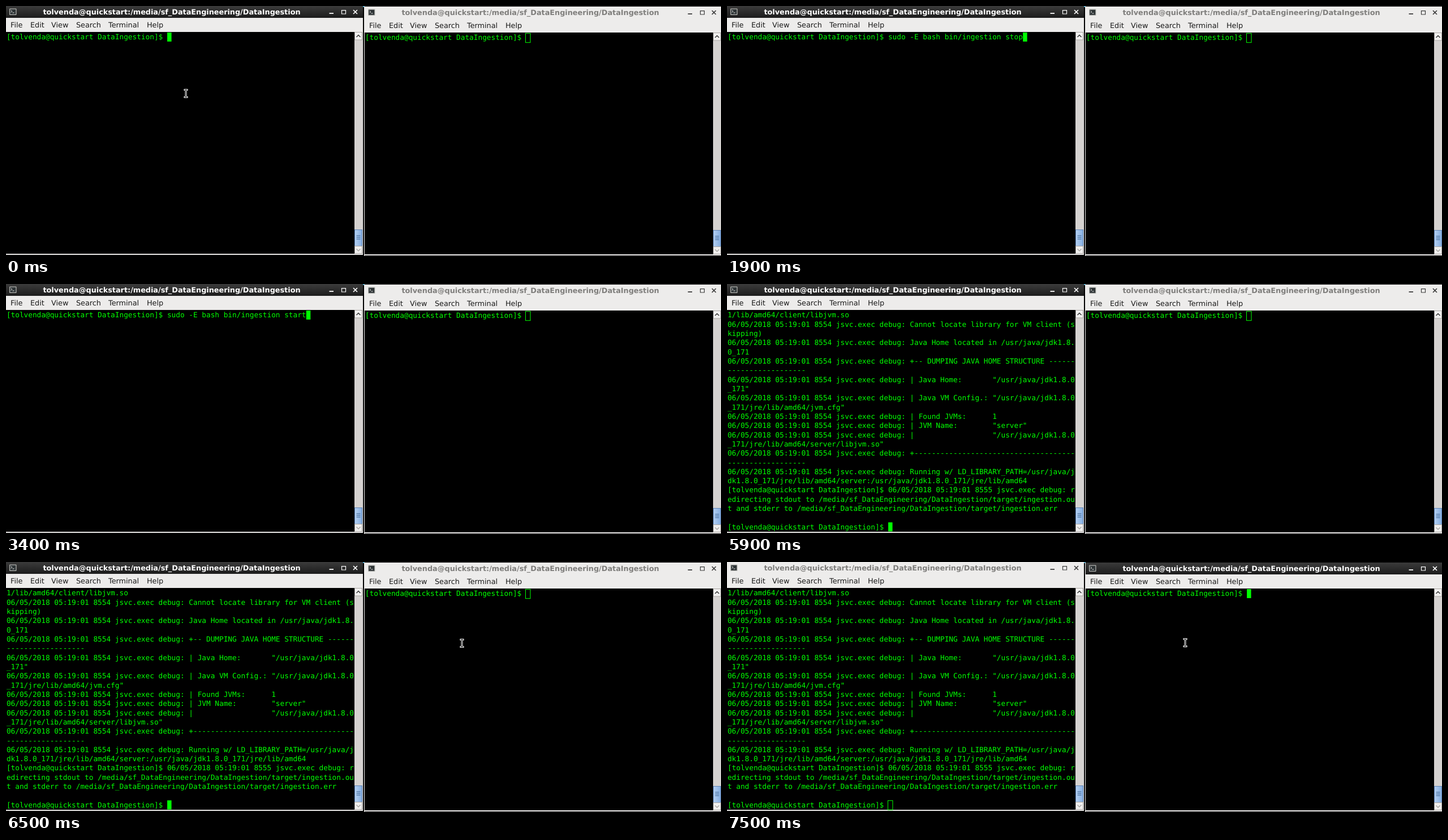
Animation, 1264 px wide and 443 px high, one loop 8 s. Source, as an HTML page:

```html
<!DOCTYPE html>
<html lang="en">
<head>
<meta charset="utf-8">
<title>Two terminals</title>
<style>
  html, body { margin: 0; width: 100%; height: 100%; overflow: hidden; background: #000; }
  svg { display: block; }
  text { white-space: pre; text-rendering: geometricPrecision; font: 12.8px "DejaVu Sans", sans-serif; }
  .title { font-weight: bold; text-anchor: middle; }
  .mono { font: 12.757px "DejaVu Sans Mono", monospace; fill: #0f0; }
</style>
</head>
<body>
<svg id="stage" width="1264" height="443" viewBox="0 0 1264 443"></svg>
<script>
const LOOP = 8000, COLS = 80, CELL = 7.68, ROW = 16.32, LEFT = 0.9, TOP = 47;
const USER = 'tolvenda@quickstart';
const TITLE = USER + ':/media/sf_DataEngineering/DataIngestion';
const PROMPT = `[${USER} DataIngestion]$ `;
const MENU = [['File', 8], ['Edit', 43], ['View', 80], ['Search', 124], ['Terminal', 181], ['Help', 249]];

const JDK = '/usr/java/jdk1.8.0_171', LIB = JDK + '/jre/lib/amd64', OUT = '/media/sf_DataEngineering/DataIngestion/target/ingestion';
const field = (name, value) => '| ' + name.padEnd(17) + value;
const log = [
  `Checking library ${JDK}/lib/amd64/client/libjvm.so`,
  'Cannot locate library for VM client (skipping)',
  `Java Home located in ${JDK}`,
  '+-- DUMPING JAVA HOME STRUCTURE ' + '-'.repeat(24),
  field('Java Home:', `"${JDK}"`),
  field('Java VM Config.:', `"${LIB}/jvm.cfg"`),
  field('Found JVMs:', '1'),
  field('JVM Name:', '"server"'),
  field('', `"${LIB}/server/libjvm.so"`),
  '+' + '-'.repeat(55),
  `Running w/ LD_LIBRARY_PATH=${LIB}/server:${LIB}`
].map(s => '06/05/2018 05:19:01 8554 jsvc.exec debug: ' + s);
log.push(`${PROMPT}06/05/2018 05:19:01 8555 jsvc.exec debug: redirecting stdout to ${OUT}.out and stderr to ${OUT}.err`);

const wrapped = log.flatMap(s => s.match(new RegExp(`.{1,${COLS}}`, 'g')));
const started = [...wrapped, ''];
const done = [...wrapped.slice(1), '', PROMPT];
const command = s => [PROMPT + s];

// Each step: start time, lines of the left terminal, pointer position, focused window
const steps = [
  [0, command(''), [318, 155], 0],
  [1400, command(''), null, 0],
  [1500, command('clear'), null, 0],
  [1900, command('sudo -E bash bin/ingestion stop'), null, 0],
  [3400, command('sudo -E bash bin/ingestion start'), null, 0],
  [4200, started, null, 0],
  [5900, done, null, 0],
  [6500, done, [806, 144], 0],
  [7200, done, [810, 143], 0],
  [7500, done, [810, 143], 1]
];

const rect = (x, y, w, h, fill, more = '') => `<rect x="${x}" y="${y}" width="${w}" height="${h}" fill="${fill}" ${more}/>`;
const line = (d, color, width = 1) => `<path d="${d}" fill="none" stroke="${color}" stroke-width="${width}"/>`;
const text = (x, y, s, more) => `<text x="${x}" y="${y}" ${more}>${s}</text>`;

function titleBar(focused) {
  const ink = focused ? '#fff' : '#3c3c3c';
  return rect(0, 0, 631, 21, focused ? 'url(#dark)' : '#edeceb') +
    rect(6, 4.5, 12.5, 11.5, '#b9bab6', 'rx="1"') + rect(7.2, 5.7, 10.1, 9.1, '#2e3436') +
    line('M8.7 7.7L11 9.5L8.7 11.3M11.5 12H14.5', '#e4e4e2') +
    text(293, 14.5, TITLE, `class="title" fill="${focused ? '#fff' : '#7f7e7c'}"`) +
    line('M571.5 13H579', ink, 1.8) +
    line('M593.5 7.5H600.5V14H593.5ZM593 7.7H601', ink, 1.2) +
    line('M614 7L621 14M621 7L614 14', ink, 1.7);
}

function scrollBar() {
  return rect(616, 46, 14, 393, '#d5d2d0') +
    rect(616.5, 46.5, 13, 13.5, '#f1f0ef', 'stroke="#a9a5a2"') +
    line('M619.5 55L623 51.5L626.5 55', '#333', 1.5) +
    rect(616.5, 396.5, 13, 29, 'url(#blue)', 'stroke="#5f83b5"') +
    line('M619.5 407H626.5M619.5 410H626.5M619.5 413H626.5', '#39608f') +
    rect(616.5, 425.5, 13, 13, '#f1f0ef', 'stroke="#a9a5a2"') +
    line('M619.5 430.5L623 434L626.5 430.5', '#aaa7a4', 1.5);
}

function terminal(lines, focused) {
  const row = lines.length - 1;
  const x = LEFT + lines[row].length * CELL, y = TOP + row * ROW;
  const caret = focused
    ? rect(x, y, CELL - 0.2, ROW - 0.3, '#0f0')
    : rect(x - 0.6, y + 0.4, CELL + 0.8, ROW, 'none', 'stroke="#0f0"');
  return lines.map((s, i) => text(LEFT, TOP + 12.4 + i * ROW, s, 'class="mono"')).join('') + caret;
}

function win(x, y, lines, focused) {
  return `<g transform="translate(${x} ${y})">` +
    rect(0, 0, 631, 441, '#edeceb') + titleBar(focused) +
    MENU.map(([s, mx]) => text(mx, 38.3, s, 'fill="#1a1a1a"')).join('') +
    rect(0, 46, 616, 393, '#000') + scrollBar() + terminal(lines, focused) + '</g>';
}

function pointer([x, y]) {
  const beam = 'M-2 -6.5H2M0 -6.5V6.5M-2 6.5H2';
  return `<g transform="translate(${x} ${y})" stroke-linecap="square">` +
    line(beam, '#fff', 3) + line(beam, '#000', 1) + '</g>';
}

const gradient = (id, ax, from, to) => `<linearGradient id="${id}" x1="0" y1="0" ${ax}><stop stop-color="${from}"/><stop offset="1" stop-color="${to}"/></linearGradient>`;
const defs = gradient('dark', 'x2="0" y2="1"', '#3b3b3b', '#1c1c1c') + gradient('blue', 'x2="1" y2="0"', '#b4d0f2', '#86aee0');

const stage = document.getElementById('stage');
let shown;
function frame(now) {
  const t = now % LOOP, step = steps.findLast(s => s[0] <= t);
  if (step !== shown) {
    shown = step;
    const [, lines, mouse, focus] = step;
    stage.innerHTML = defs + rect(631, 0, 3, 2, '#4fa3c4') +
      win(0, 0, lines, focus === 0) + win(634, 1, command(''), focus === 1) +
      rect(633, 1, 1, 442, '#edeceb') + (mouse ? pointer(mouse) : '');
  }
  requestAnimationFrame(t => frame(t - start));
}
const start = performance.now();
frame(0);
</script>
</body>
</html>
```
